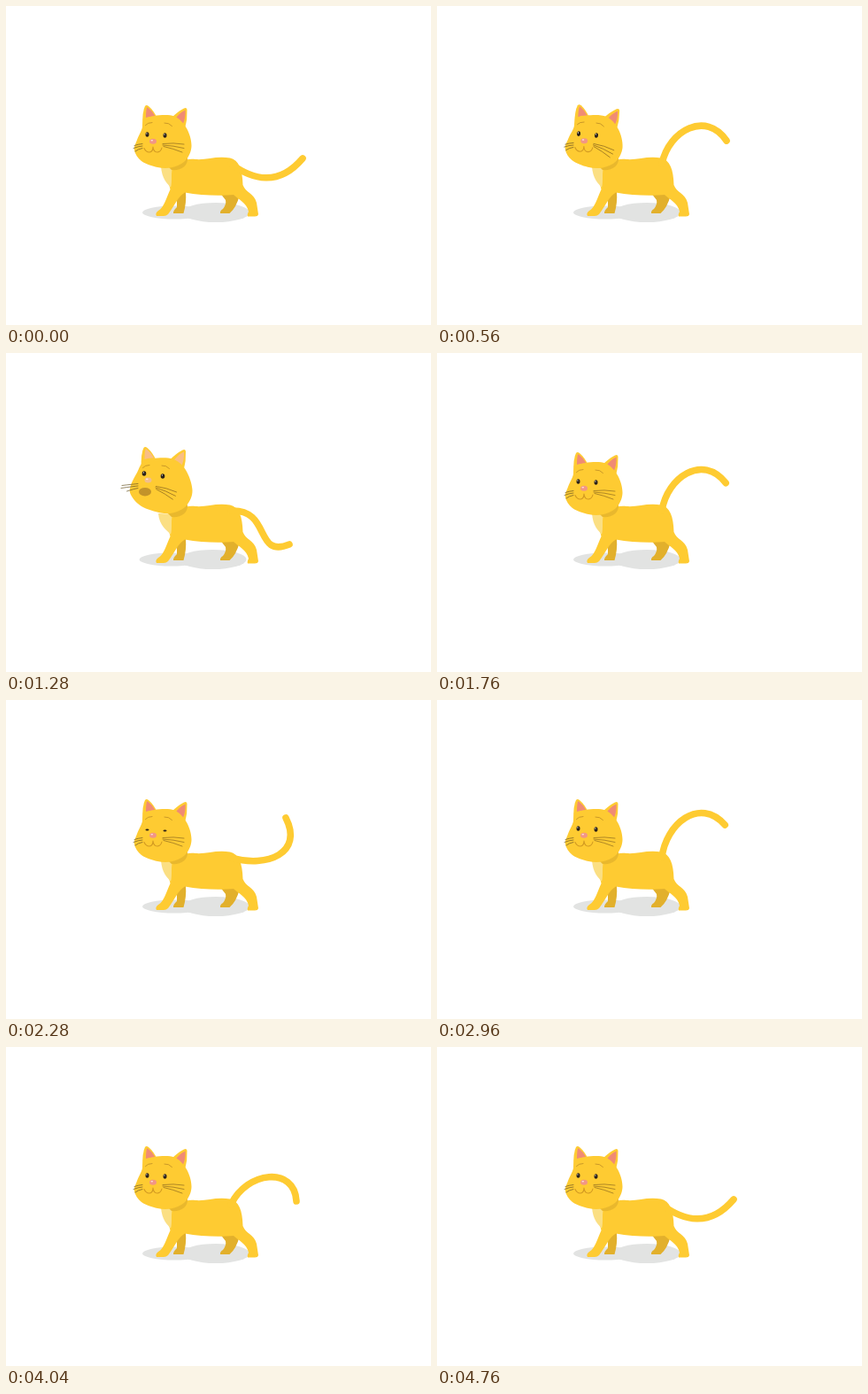
These frames come from a looping animation (480 by 360 pixels, 4800 ms). An HTML page with a canvas:

```html
<!DOCTYPE html>
<html lang="en">
<head>
<meta charset="utf-8">
<title>Cat</title>
<style>
html, body { margin: 0; width: 100%; height: 100%; overflow: hidden; background: #fff; }
canvas { display: block; }
</style>
</head>
<body>
<canvas id="stage" width="480" height="360"></canvas>
<script>
const ctx = document.getElementById("stage").getContext("2d");
const LOOP = 4800, STEP = 40, SWISH = 1190;
const FUR = "#fecb32", FAR_FUR = "#e2b02c", CREAM = "#fbdf83", SHADOW = "#e2e3e2";
const INK = "#2b2118", LINE = "#d29a22";

// Tail poses: phase in ms, two control points, tip.
const TAIL_ROOT = [254, 178];
const TAIL = [
  [0, 278, 196, 308, 204, 335, 172],
  [90, 300, 176, 280, 232, 320, 216],
  [190, 296, 166, 284, 222, 312, 226],
  [320, 284, 150, 312, 156, 318, 214],
  [470, 272, 140, 326, 134, 328, 174],
  [515, 267, 140, 319, 125, 330, 163],
  [560, 262, 140, 304, 118, 327, 152],
  [583, 258, 140, 296, 108, 325, 140],
  [740, 256, 140, 274, 106, 312, 110],
  [880, 272, 172, 302, 150, 300, 100],
  [985, 286, 186, 322, 166, 306, 113],
  [1090, 296, 190, 336, 172, 316, 133]
];

// Head outline at rest and while meowing.
const HEAD = [[168, 124], [190, 124.5], [204, 138], [209.5, 158], [203, 174], [188, 182],
  [171, 182], [153, 175], [145, 163], [148, 151], [153, 140], [157, 129]];
const HEAD_UP = [[166, 119], [188, 119.5], [203, 132], [210.5, 155], [204, 172], [190, 180],
  [175, 180.5], [153, 173], [141, 160], [141, 149], [148, 135], [154, 124]];

const lerp = (a, b, k) => a + (b - a) * k;
const mix = (a, b, k) => a.map((v, i) => lerp(v, b[i], k));
const rgb = c => `rgb(${c.map(Math.round).join()})`;
const ease = (t, from, to) => {
  const k = Math.min(1, Math.max(0, (t - from) / (to - from)));
  return k * k * (3 - 2 * k);
};

function fill(d, color) {
  ctx.fillStyle = color;
  ctx.fill(new Path2D(d));
}

function stroke(d, color, width) {
  ctx.strokeStyle = color;
  ctx.lineWidth = width;
  ctx.stroke(new Path2D(d));
}

function oval(x, y, rx, ry, color) {
  ctx.fillStyle = color;
  ctx.beginPath();
  ctx.ellipse(x, y, rx, ry, 0, 0, 2 * Math.PI);
  ctx.fill();
}

function blob(points, color) {
  const n = points.length, at = i => points[(i + n) % n];
  ctx.beginPath();
  ctx.moveTo(...points[0]);
  for (let i = 0; i < n; i++) {
    const [a, b, c, d] = [at(i - 1), at(i), at(i + 1), at(i + 2)];
    ctx.bezierCurveTo(b[0] + (c[0] - a[0]) / 6, b[1] + (c[1] - a[1]) / 6,
      c[0] - (d[0] - b[0]) / 6, c[1] - (d[1] - b[1]) / 6, c[0], c[1]);
  }
  ctx.fillStyle = color;
  ctx.fill();
}

// Periodic cubic interpolation through the tail poses.
function tailPose(phase) {
  const n = TAIL.length;
  const key = i => {
    const wrap = Math.floor(i / n), [time, ...pose] = TAIL[i - wrap * n];
    return { time: time + wrap * SWISH, pose };
  };
  let i = n - 1;
  while (TAIL[i][0] > phase) i--;
  const [a, b, c, d] = [key(i - 1), key(i), key(i + 1), key(i + 2)];
  const span = c.time - b.time, k = (phase - b.time) / span;
  const k2 = k * k, k3 = k2 * k;
  return b.pose.map((v, j) => {
    const m0 = (c.pose[j] - a.pose[j]) / (c.time - a.time) * span;
    const m1 = (d.pose[j] - v) / (d.time - b.time) * span;
    return (2 * k3 - 3 * k2 + 1) * v + (k3 - 2 * k2 + k) * m0
      + (3 * k2 - 2 * k3) * c.pose[j] + (k3 - k2) * m1;
  });
}

function drawTail(t) {
  stroke(`M${TAIL_ROOT}C${tailPose(t % SWISH)}`, FUR, 7.6);
}

function drawBody(meow) {
  const dx = -3.5 * meow;
  oval(190 + dx, 233, 36, 7.5, SHADOW);
  oval(237 + dx, 233, 38, 11, SHADOW);
  fill("M193 207L203 210Q204 222 200.500 234L189 234Q188.500 231 193 227Z", FAR_FUR);
  fill("M241 210L264 213Q260 228 252.500 234L242 234Q241.500 231 245 229Q249 224 248 219Z", FAR_FUR);
  fill(`M182 182C192 178 203 171 214 173C227 174 237 169 253 171.500
    C263 174 267 184 267.500 202C271 211 280 211 283 222L285 235Q284.500 237.500 281 237.500
    L273 237.500Q272 236 274 232C272 222 262 218 257 213
    C243 214.500 220 214 202 210.500C194 215 191 225 183 235Q181 237 178 237
    L170 237Q168 234 172 231C178 228 181 217 185.500 207C184 199 180 193 182 182Z`, FUR);
  const cx = -3 * meow;
  fill(`M${175 + cx} 181L188 182C186 190 188 198 186 205C182 200 ${176 + cx} 195 ${175 + cx} 181Z`, CREAM);
  fill("M181 179C188 178 198 175 205 171C206 181 197 186 187 185Z", "#e9b82d");
}

function drawEars(meow) {
  const pink = rgb(mix([240, 139, 116], [249, 190, 132], meow));
  ctx.save();
  ctx.translate(-1.5 * meow, -6 * meow);
  fill("M154 137Q154 118 157 113Q158.500 111 161 113Q167 118 171 127Z", FUR);
  fill("M158 126Q158 116 159.500 114Q165 118 168.500 124.500Q162 124 158 126Z", pink);
  fill("M186 127Q194 119 201 115.500Q204 114 204.500 117Q205 128 202 139Z", FUR);
  fill("M190 129Q195 121 202.500 117.500Q203 126 200 133Q196 129 190 129Z", pink);
  ctx.restore();
}

function drawWhiskers(meow, droop) {
  ctx.save();
  ctx.translate(lerp(177, 169.5, meow), lerp(155, 150, meow));
  ctx.rotate(0.25 * droop);
  stroke("M0 0.500Q12 -1 24 1M0 2Q12 2.500 24 5.500M1 3.500Q12 6 22 10", "#8d6a20", 0.7);
  ctx.restore();
  const reach = 9 * meow;
  ctx.save();
  ctx.translate(-5 * meow, -8 * meow);
  stroke(`M154 155.500Q149 156 ${145 - reach} 157.500M154 158Q149 158.500 ${144 - reach} 160.500
    M154 160.500Q149 161.500 ${146 - reach / 2} 164`, "#6b5626", 0.7);
  ctx.restore();
}

function drawFace(meow, droop, blink) {
  drawWhiskers(meow, droop);
  ctx.save();
  ctx.translate(-3 * meow, -5 * meow);
  stroke("M157.500 134.500Q160 131.500 165 131.500M179 132Q184 131.500 187.500 135.500", "#bd8c25", 0.8);
  ctx.restore();

  const lid = lerp(2.8, 1.1, blink), drop = 1.5 * blink;
  for (const [x, y] of [mix([159.5, 145], [156, 136], meow), mix([179.5, 146], [177, 139], meow)]) {
    oval(x, y + drop, 2 + 0.3 * meow, lid, INK);
    if (!blink) oval(x - 0.6, y - 1.1, 0.6, 0.7, "#fff");
  }

  if (meow > 0.05) {
    oval(lerp(166, 157, meow), lerp(162, 156.700, meow), 7 * meow, 4.8 * meow, "#c2932a");
  }
  if (meow < 0.6) {
    ctx.save();
    ctx.globalAlpha = 1 - meow / 0.6;
    ctx.translate(-9 * meow, -6 * meow);
    stroke("M156 160.500Q158 165 162 165Q166 164.500 166 159Q166.500 165 171 165Q175 164.500 176 160", LINE, 1.1);
    ctx.restore();
  }
  const [nx, ny] = mix([166, 152.800], [160.5, 143.5], meow);
  oval(nx, ny, 4, 3, rgb(mix([242, 150, 132], [241, 190, 140], meow)));
  oval(nx - 1.2, ny - 1.1, 1.3, 0.8, "#fbe3dc");
}

function draw(t) {
  const meow = ease(t, 530, 900) * (1 - ease(t, 1340, 1660));
  const droop = ease(t, 420, 560) * (1 - ease(t, 1440, 1680));
  const blink = ease(t, 2200, 2280) * (1 - ease(t, 2320, 2400));
  const glance = ease(t, 100, 280) * (1 - ease(t, 320, 520));
  const nod = droop * (1 - meow);

  ctx.clearRect(0, 0, 480, 360);
  ctx.lineCap = "round";
  ctx.lineJoin = "round";
  drawBody(meow);
  drawTail(t);

  ctx.save();
  ctx.translate(177 - 3 * glance, 160);
  ctx.rotate(0.04 * nod);
  ctx.translate(-177, -160);
  drawEars(meow);
  blob(HEAD.map((p, i) => mix(p, HEAD_UP[i], meow)), FUR);
  drawFace(meow, droop, blink);
  ctx.restore();
}

const start = performance.now();
function tick() {
  const t = (performance.now() - start) % LOOP;
  draw(Math.floor(t / STEP) * STEP);
  requestAnimationFrame(tick);
}
tick();
</script>
</body>
</html>
```
